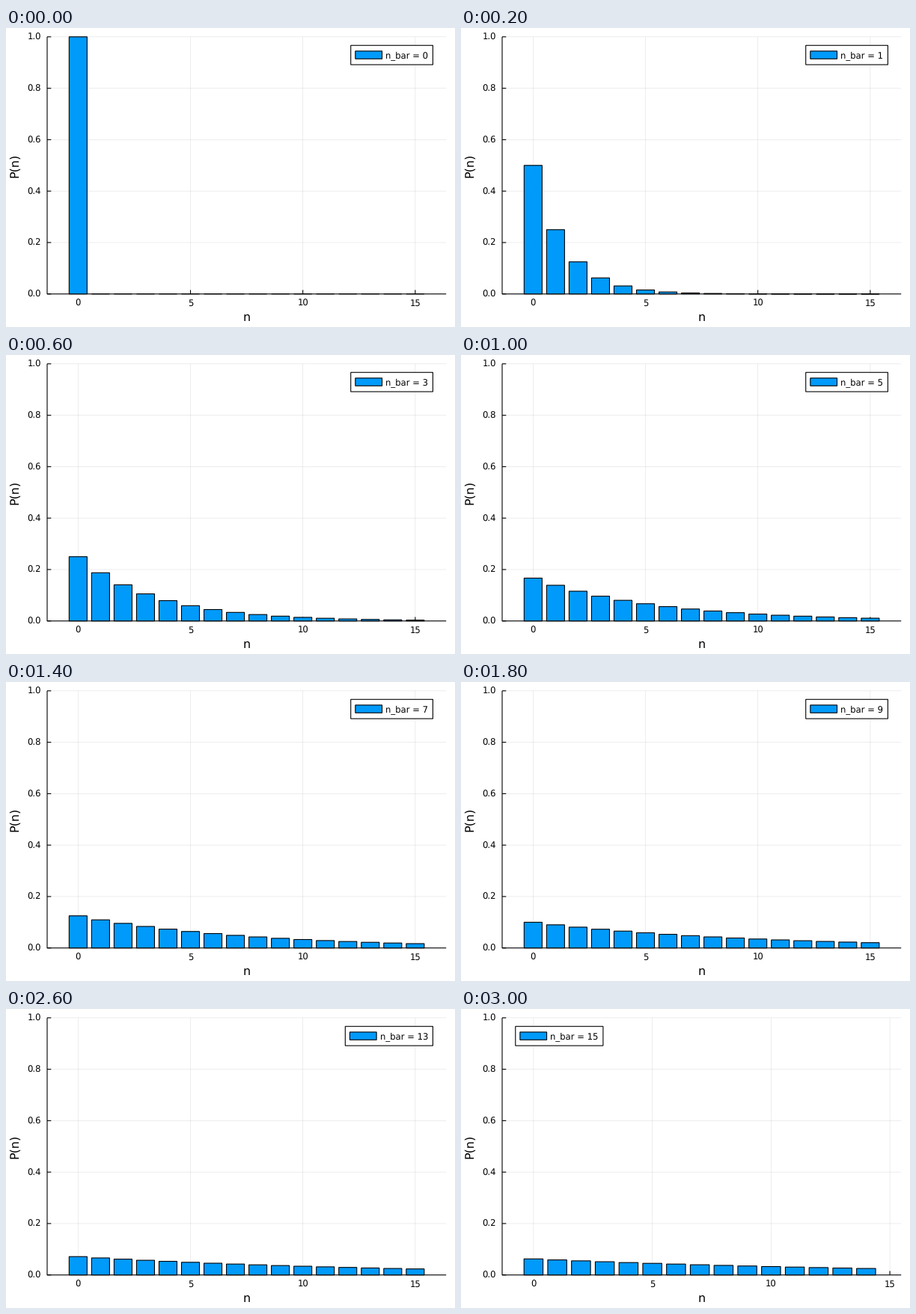
A matplotlib script that plays this animation: 600 by 400 pixels, repeating every 3.2 s.

```python
import matplotlib.pyplot as plt
import numpy as np
from matplotlib.animation import FuncAnimation
from matplotlib.patches import Rectangle

W, H, DPI = 600, 400, 100
PX = 72 / DPI  # points per pixel
FRAMES, INTERVAL = 16, 200
LEFT, RIGHT, TOP, BOTTOM = 55.0, 588.2, 11.8, 355.8
BLUE = "#009AFA"
SMALL, LARGE = 11.6, 16.0
STROKE = 1.1

plt.rcParams.update({
    "font.family": "DejaVu Sans",
    "text.hinting": "none",
    "path.snap": False,
})

fig = plt.figure(figsize=(W / DPI, H / DPI), dpi=DPI, facecolor="white")
ax = fig.add_axes([0, 0, 1, 1])


def line(xs, ys, width=STROKE, **style):
    ax.plot(xs, ys, color="black", lw=width * PX,
            solid_capstyle="butt", **style)


def box(x, y, w, h, fill, z):
    ax.add_patch(Rectangle((x, y), w, h, facecolor=fill, edgecolor="black",
                           lw=STROKE * PX, joinstyle="miter", zorder=z))


def label(x, y, text, size=SMALL, ha="center", **style):
    ax.text(x, y, text, fontsize=size * PX, ha=ha, va="baseline",
            zorder=6, **style)


def thermal(n, n_bar):
    return (n_bar / (1 + n_bar)) ** n / (1 + n_bar)


def x_limits(last):
    """Bar extent padded by 3 %, stretched to hold 15, padded again."""
    lo, hi = -0.4, last + 0.4
    pad = 0.03 * (hi - lo)
    lo, hi = lo - pad, max(hi + pad, 15)
    pad = 0.03 * (hi - lo)
    return lo - pad, hi + pad


def y_px(p):
    return BOTTOM - p * (BOTTOM - TOP)


def draw_axes(x_px):
    for v in np.arange(6) / 5:
        y = y_px(v)
        line([LEFT, RIGHT], [y, y], 0.7, alpha=0.1, zorder=1)
        line([LEFT, LEFT + 5.3], [y, y], zorder=2)
        label(46.8, y + 4.2, f"{v:.1f}", ha="right")
    for v in range(0, 16, 5):
        x = x_px(v)
        line([x, x], [TOP, BOTTOM], 0.7, alpha=0.1, zorder=1)
        line([x, x], [BOTTOM, BOTTOM - 5.3], zorder=2)
        label(x, 371.5, str(v))
    line([LEFT, LEFT, RIGHT], [TOP, BOTTOM, BOTTOM], zorder=2)
    label((LEFT + RIGHT) / 2, 391.6, "n", LARGE)
    label(16.3, (TOP + BOTTOM) / 2, "P(n)", LARGE,
          rotation=90, rotation_mode="anchor")


def draw_legend(n_bar, at_left):
    width = 109.7 if n_bar < 10 else 117.1
    inset = (RIGHT - LEFT) / 30
    x = LEFT + inset if at_left else RIGHT - inset - width
    y = TOP + (BOTTOM - TOP) / 30
    box(x, y, width, 25.8, "white", 4)
    box(x + 6.1, y + 7.6, 35.7, 10.4, BLUE, 5)
    label(x + 46.3, y + 17.3, f"n_bar = {n_bar}", ha="left")


def draw(n_bar):
    ax.cla()
    ax.set(xlim=(0, W), ylim=(H, 0))
    ax.axis("off")

    # 16**16 overflows 64 bits, so the final chart loses its last bar
    last = 14 if n_bar == 15 else 15
    lo, hi = x_limits(last)
    scale = (RIGHT - LEFT) / (hi - lo)

    def x_px(v):
        return LEFT + (v - lo) * scale

    draw_axes(x_px)
    for n in range(last + 1):
        top = y_px(thermal(n, n_bar))
        box(x_px(n - 0.4), top, 0.8 * scale, BOTTOM - top, BLUE, 3)
    draw_legend(n_bar, at_left=last == 14)
    return []


anim = FuncAnimation(fig, draw, frames=FRAMES, init_func=lambda: [],
                     interval=INTERVAL, repeat=True, repeat_delay=0)
plt.show()
```
